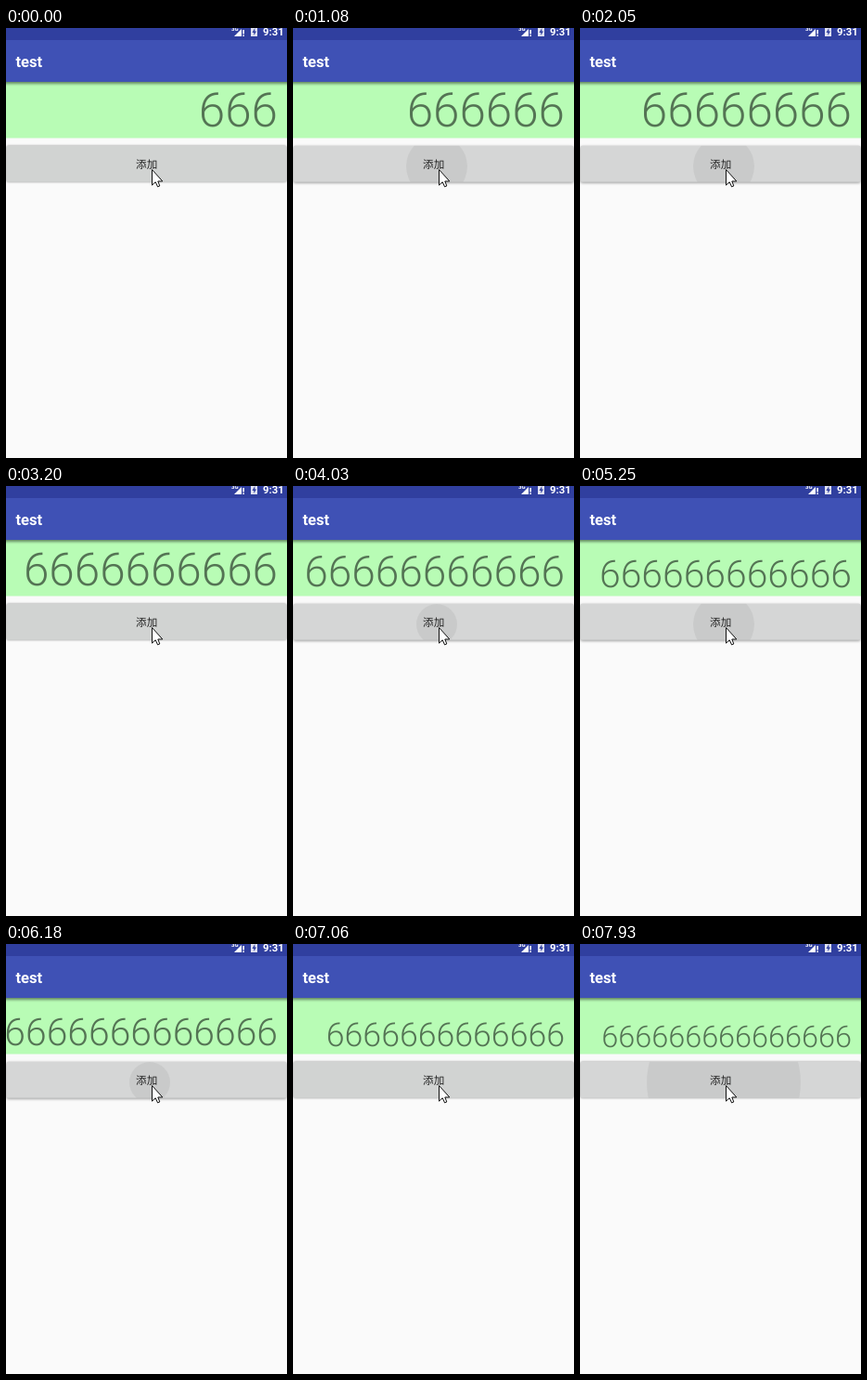
Recreate the animation shown at these times as an HTML page. Size 303 px wide and 463 px high, loop 8000 ms.

```html
<!DOCTYPE html>
<html lang="zh-CN">
<head>
<meta charset="utf-8">
<style>
  html, body { margin: 0; width: 100%; height: 100%; overflow: hidden; background: #fafafa; }
  svg { display: block; width: 303px; height: 463px; }
  text { font-family: Roboto, "Noto Sans CJK SC", "Noto Sans CJK", sans-serif; text-rendering: geometricPrecision; }
  .bar { filter: drop-shadow(0 2px 1.8px #0007); }
  #button { fill: #d1d3d2; filter: drop-shadow(0 .6px .8px #0006); }
  #button.pressed { fill: #d5d6d6; }
  #button.raised { filter: drop-shadow(0 1.4px 1.5px #0006); }
</style>
</head>
<body>
<svg viewBox="0 0 303 463">
  <clipPath id="face"><rect x=".5" y="126.8" width="302" height="39" rx="1.7"/></clipPath>
  <rect width="303" height="463" fill="#fafafa"/>
  <rect y="57" width="303" height="61.5" fill="#b8fcb5"/>
  <text id="digits" x="293" text-anchor="end" font-weight="300" fill="#547454"></text>

  <!-- app bar and status bar -->
  <rect class="bar" x="-5" width="313" height="58" fill="#3f51b5"/>
  <rect width="303" height="13" fill="#303f9f"/>
  <text x="10.4" y="42" font-size="16.6" font-weight="600" fill="#fff">test</text>
  <g fill="#fff">
    <text x="243" y="2.5" font-size="6" font-weight="700">3G</text>
    <path d="M246 9L254 1V9Z M255.3 2h1.6v4.5h-1.6z M255.3 7.5h1.6v1.5h-1.6z"/>
    <path d="M264 0h7v9h-7z" opacity=".85"/>
    <path d="M268.3 0L265.5 5H267.3V8L270 3.5H268.3Z" fill="#303f9f"/>
    <text x="277" y="8" font-size="11.3" font-weight="600">9:31</text>
  </g>

  <!-- button -->
  <rect id="button" x=".5" y="126.8" width="302" height="39" rx="1.7"/>
  <g clip-path="url(#face)"><circle id="ripple" cx="155" cy="149" fill-opacity=".055"/></g>
  <text x="151.7" y="150.5" font-size="11.6" font-weight="500" text-anchor="middle" fill="#222">添加</text>

  <!-- pointer -->
  <path d="M157.5 152.5V169.2L161.2 165.8L163.6 171L165.8 170L163.8 165H168.8Z" fill="#fff" stroke="#111"/>
</svg>
<script>
const LOOP = 8000, STEP = 130, SHRINK_TIME = 300;
const FULL_SIZE = 51.2, SIZE_DROP = 5.17;

const taps = [280, 690, 1080, 1590, 2050, 2500, 2930, 4030, 5250, 6180, 7200, 7800];
const shrinks = [3070, 4200, 6230, 7755];   // when an overflowing number starts to shrink

const $ = id => document.getElementById(id);
const set = (id, attrs) => Object.entries(attrs).forEach(([k, v]) => $(id).setAttribute(k, v));
const ease = p => (1 - Math.cos(Math.PI * Math.min(Math.max(p, 0), 1))) / 2;

// A slow screen: after each tap the picture refreshes only every STEP ms.
function draw(t) {
  const done = taps.filter(tap => tap <= t);
  const tap = done.at(-1) ?? -LOOP;
  const refresh = Math.floor((t - tap) / STEP);
  const now = tap + refresh * STEP;

  const drops = shrinks.reduce((sum, s) => sum + ease((now - s) / SHRINK_TIME), 0);
  const size = FULL_SIZE - SIZE_DROP * drops;
  $("digits").textContent = "6".repeat(3 + done.length);
  set("digits", { "font-size": size, y: 118.8 - 0.244 * size });

  // The ripple lasts one refresh longer while the number shrinks.
  const shrinking = shrinks.some(s => Math.abs(s - tap) < 200);
  const radii = shrinking ? [22, 83] : [33];
  const r = radii[refresh] ?? 0;
  set("ripple", { r });
  $("button").classList.toggle("pressed", r > 0);
  $("button").classList.toggle("raised", refresh === 0);
}

const start = performance.now();
function tick() {
  draw((performance.now() - start) % LOOP);
  requestAnimationFrame(tick);
}
tick();
</script>
</body>
</html>
```
